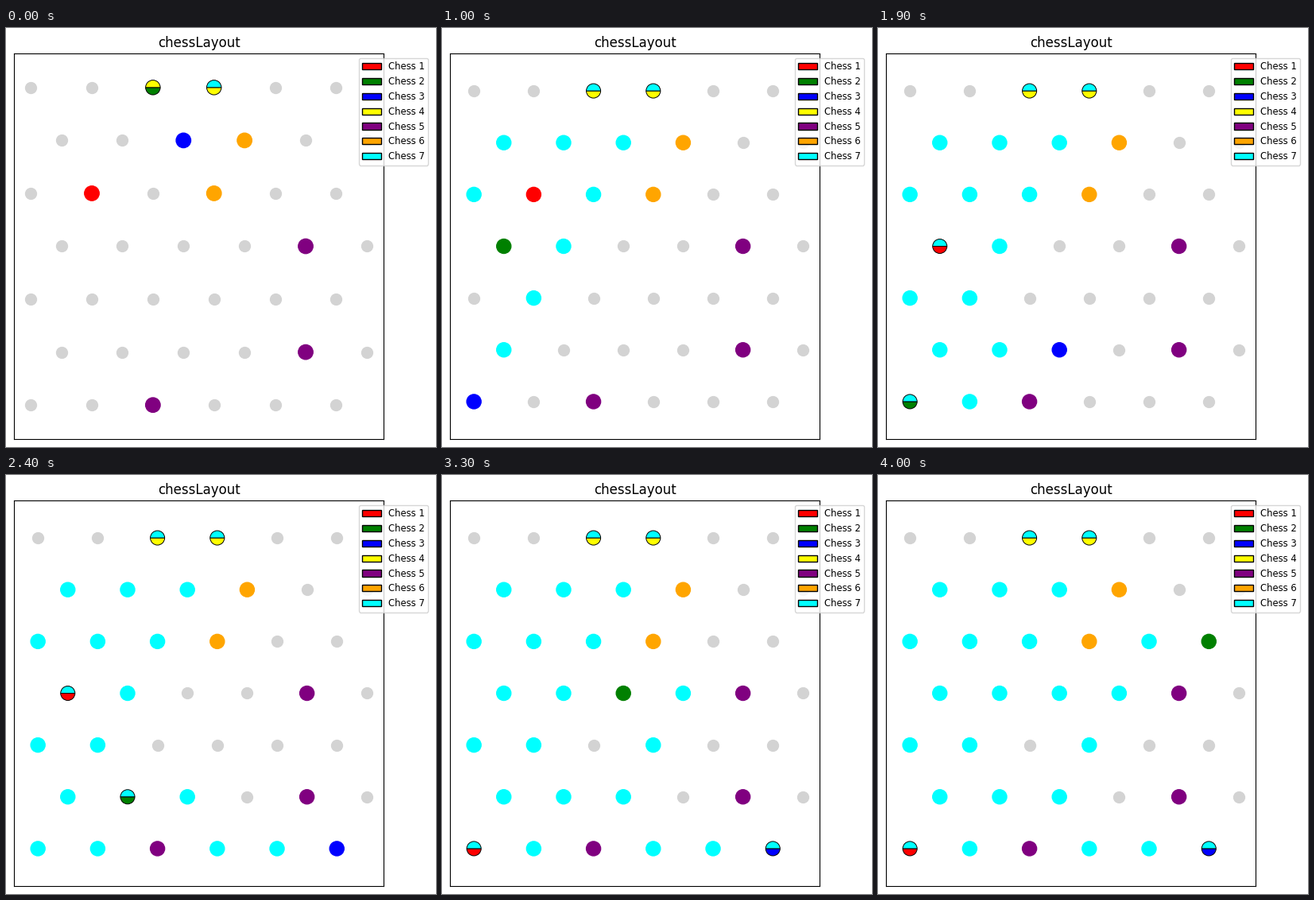
These frames come from a looping animation (541x527 px, 4100 ms). A matplotlib script:

```python
import math

import matplotlib.pyplot as plt
from matplotlib.animation import FuncAnimation
from matplotlib.patches import Circle, Patch, Wedge

W, H, DPI = 541, 527, 100
LEFT, TOP, AX_W, AX_H = 10, 32, 465, 485
ROW = math.sqrt(3) / 2
RADIUS = 0.12
COLORS = ["red", "green", "blue", "yellow", "purple", "orange", "cyan"]
RED, GREEN, BLUE, GOAL, WALL, BLOCK, VISITED = range(7)

FIXED = {
    GOAL: [(2, 6), (3, 6)],
    WALL: [(4.5, 3), (4.5, 1), (2, 0)],
    BLOCK: [(3.5, 5), (3, 4)],
}
START = {RED: (1, 4), GREEN: (2, 6), BLUE: (2.5, 5)}

# Turns in order: the piece and the goals it walks to
TURNS = [
    (BLUE, [(0, 0)]),
    (GREEN, [(2.5, 5), (0.5, 5), (0.5, 3), (0, 2), (1, 2), (0, 0)]),
    (RED, [(0, 4), (0.5, 3)]),
    (BLUE, [(1, 0), (2.5, 1), (5, 0)]),
    (GREEN, [(1, 0), (2.5, 1), (3.5, 3)]),
    (RED, [(0, 0)]),
    (BLUE, [(4, 0), (5, 0)]),
    (GREEN, [(2.5, 3)]),
    (RED, [(0.5, 1), (0, 0)] * 2),
    (GREEN, [(3.5, 3), (5, 4)]),
]


def walk(cell, goal):
    """Step through neighbouring cells: change rows first, then slide."""
    x, y = cell
    while (x, y) != goal:
        gx, gy = goal
        if y != gy:
            x += 0.5 if gx > x or x == 0 else -0.5
            y += 1 if gy > y else -1
        else:
            x += 1 if gx > x else -1
        yield x, y


def plan_moves():
    pos = dict(START)
    moves = []
    for piece, goals in TURNS:
        for goal in goals:
            moves += [(piece, cell) for cell in walk(pos[piece], goal)]
            pos[piece] = goal
    return moves


MOVES = plan_moves()


def board_at(step):
    """Map each occupied cell to the sorted ids standing on it."""
    pos = dict(START)
    visited = {(3, 6)}
    for piece, cell in MOVES[:step]:
        visited.add(pos[piece])
        pos[piece] = cell
    board = {}
    for ident, cells in FIXED.items():
        for cell in cells:
            board.setdefault(cell, []).append(ident)
    for piece, cell in pos.items():
        board.setdefault(cell, []).append(piece)
    for cell in visited:
        board.setdefault(cell, []).append(VISITED)
    return {cell: sorted(ids) for cell, ids in board.items()}


def fit_view(board):
    """Fit the limits to the grid and the discs, with equal scales."""
    lo = min(0, min(x for x, _ in board) - RADIUS)
    hi = 5.5
    margin = 0.05 * (hi - lo)
    ax.set_xlim(lo - margin, hi + margin)
    half = (hi - lo + 2 * margin) * AX_H / AX_W / 2
    ax.set_ylim(3 * ROW - half, 3 * ROW + half)


def draw_cell(cell, ids):
    center = (cell[0], cell[1] * ROW)
    if len(ids) == 1:
        ax.add_patch(Circle(center, RADIUS, color=COLORS[ids[0]], zorder=2))
        return
    part = 360 / len(ids)
    for i, ident in enumerate(ids):
        start = 180 + i * part
        ax.add_patch(Wedge(center, RADIUS, start, start + part, zorder=2,
                           facecolor=COLORS[ident], edgecolor="black",
                           linewidth=0.7))


def draw(step):
    for patch in list(ax.patches):
        patch.remove()
    board = board_at(step)
    fit_view(board)
    for cell, ids in board.items():
        draw_cell(cell, ids)
    return list(ax.patches)


fig = plt.figure(figsize=((W + 1e-6) / DPI, (H + 1e-6) / DPI), dpi=DPI,
                 facecolor="white")
ax = fig.add_axes([LEFT / W, 1 - (TOP + AX_H) / H, AX_W / W, AX_H / H])
ax.set_xticks([])
ax.set_yticks([])
ax.set_title("chessLayout", fontsize=12, family="DejaVu Sans")

grid = [(col + 0.5 * (row % 2), row * ROW)
        for row in range(7) for col in range(6)]
ax.scatter(*zip(*grid), s=100, color="lightgray", zorder=1)

handles = [Patch(facecolor=color, edgecolor="black", label=f"Chess {i}")
           for i, color in enumerate(COLORS, 1)]
ax.legend(handles=handles, loc="upper left", borderaxespad=0,
          bbox_to_anchor=(443.8 / W, 1 - 37.8 / H),
          bbox_transform=fig.transFigure,
          prop={"family": "DejaVu Sans", "size": 8.33})

anim = FuncAnimation(fig, draw, frames=len(MOVES) + 1, interval=100,
                     init_func=lambda: draw(0), repeat=True, repeat_delay=0,
                     blit=False)
plt.show()
```
